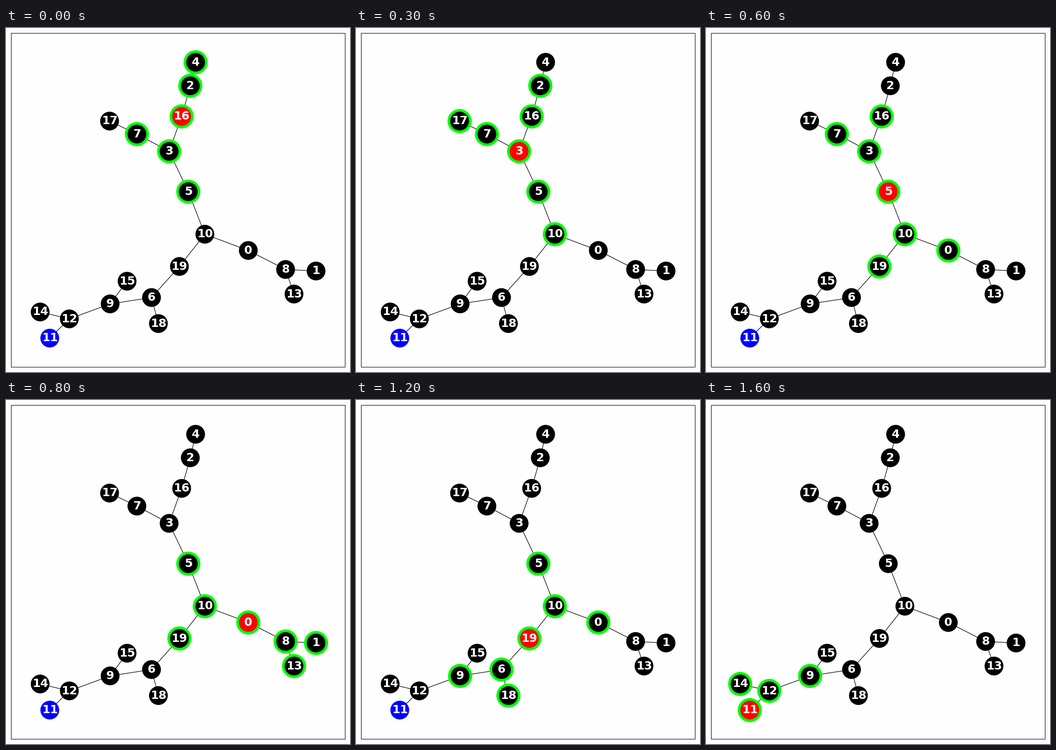
These frames come from a looping animation (748 px wide and 748 px high, 1700 ms). A matplotlib script:

```python
import matplotlib.pyplot as plt
import numpy as np
from matplotlib.animation import FuncAnimation
from matplotlib.patches import Circle, Rectangle

SIZE, DPI = 748, 100
NODE_R, RING_R = 20.4, 26.2
SIGHT = 2
START, GOAL = 16, 11

# the tree as chains of linked nodes
CHAINS = ["4 2 16 3 7 17", "3 5 10 0 8 1", "8 13",
          "10 19 6 9 12 11", "6 18", "9 15", "12 14"]
# leaves and main junctions, in pixels; the other nodes hang between them
ANCHORS = {
    4: (412.3, 74.5), 17: (225.2, 202.4), 1: (674.2, 528.4), 13: (626.2, 578.5),
    18: (331.4, 642.7), 15: (263.3, 550.6), 14: (74.3, 617.5), 11: (95.2, 674.3),
    3: (354.7, 268.2), 10: (432.4, 448.4), 6: (316.4, 586.1),
}
STRETCH = 1.25      # height of the layout before it is squeezed into the square
REPULSION = 88000


def build_tree():
    near = {}
    for chain in CHAINS:
        nodes = [int(n) for n in chain.split()]
        for a, b in zip(nodes, nodes[1:]):
            near.setdefault(a, []).append(b)
            near.setdefault(b, []).append(a)
    return near


def layout(near):
    """Spring layout: linked nodes attract, all nodes repel, anchors stay."""
    count = len(near)
    linked = np.array([[b in near[a] for b in range(count)] for a in range(count)])
    free = [n for n in range(count) if n not in ANCHORS]
    pos = np.zeros((count, 2))
    for n, (x, y) in ANCHORS.items():
        pos[n] = x, y * STRETCH

    for _ in range(200):
        for n in free:
            pos[n] = pos[near[n]].mean(axis=0)
    for _ in range(1500):
        gap = pos[:, None] - pos
        dist = np.hypot(gap[..., 0], gap[..., 1]) + np.eye(count)
        force = ((REPULSION / dist**2 - linked * dist)[..., None] * gap).sum(axis=1)
        pos[free] += 0.0005 * force[free]
    return pos / (1, STRETCH)


def explore(node, parent=None):
    """Depth-first walk to the goal; other leaves are only looked at."""
    path = [node]
    if node == GOAL:
        return path
    for n in NEAR[node]:
        if n == parent or (len(NEAR[n]) == 1 and n != GOAL):
            continue
        path += explore(n, node)
        if path[-1] == GOAL:
            break
        path.append(node)
    return path


def visible_from(node):
    seen = {node}
    for _ in range(SIGHT):
        seen |= {n for s in seen for n in NEAR[s]}
    return seen


NEAR = build_tree()
POS = layout(NEAR)
WALK = explore(START)

fig = plt.figure(figsize=(SIZE / DPI, SIZE / DPI), dpi=DPI, facecolor="#fefefe")
ax = fig.add_axes([0, 0, 1, 1])
ax.set_xlim(0, SIZE)
ax.set_ylim(SIZE, 0)
ax.axis("off")

ax.add_patch(Rectangle((11.5, 11.5), 726, 726, fill=False, lw=0.8,
                       ec="black", snap=False))
rings, discs = {}, {}
for n, (x, y) in enumerate(POS):
    for m in NEAR[n]:
        if m > n:
            ax.plot(*zip(POS[n], POS[m]), color="black", lw=0.9, zorder=1)
    rings[n] = ax.add_patch(Circle((x, y), RING_R, fc="#00ff00", lw=0, zorder=2))
    discs[n] = ax.add_patch(Circle((x, y), NODE_R, lw=0, zorder=3))
    ax.text(x, y, str(n), color="white", fontsize=18, fontweight="bold",
            family="DejaVu Sans", ha="center", va="center", zorder=4)


def node_color(n, current):
    if n == current:
        return "#ff0000"
    return "#0000ff" if n == GOAL else "black"


def update(i):
    current = WALK[i]
    seen = visible_from(current)
    for n in NEAR:
        rings[n].set_visible(n in seen)
        discs[n].set_facecolor(node_color(n, current))
    return [*rings.values(), *discs.values()]


anim = FuncAnimation(fig, update, frames=len(WALK), interval=100,
                     repeat=True, repeat_delay=0, blit=False)
plt.show()
```
